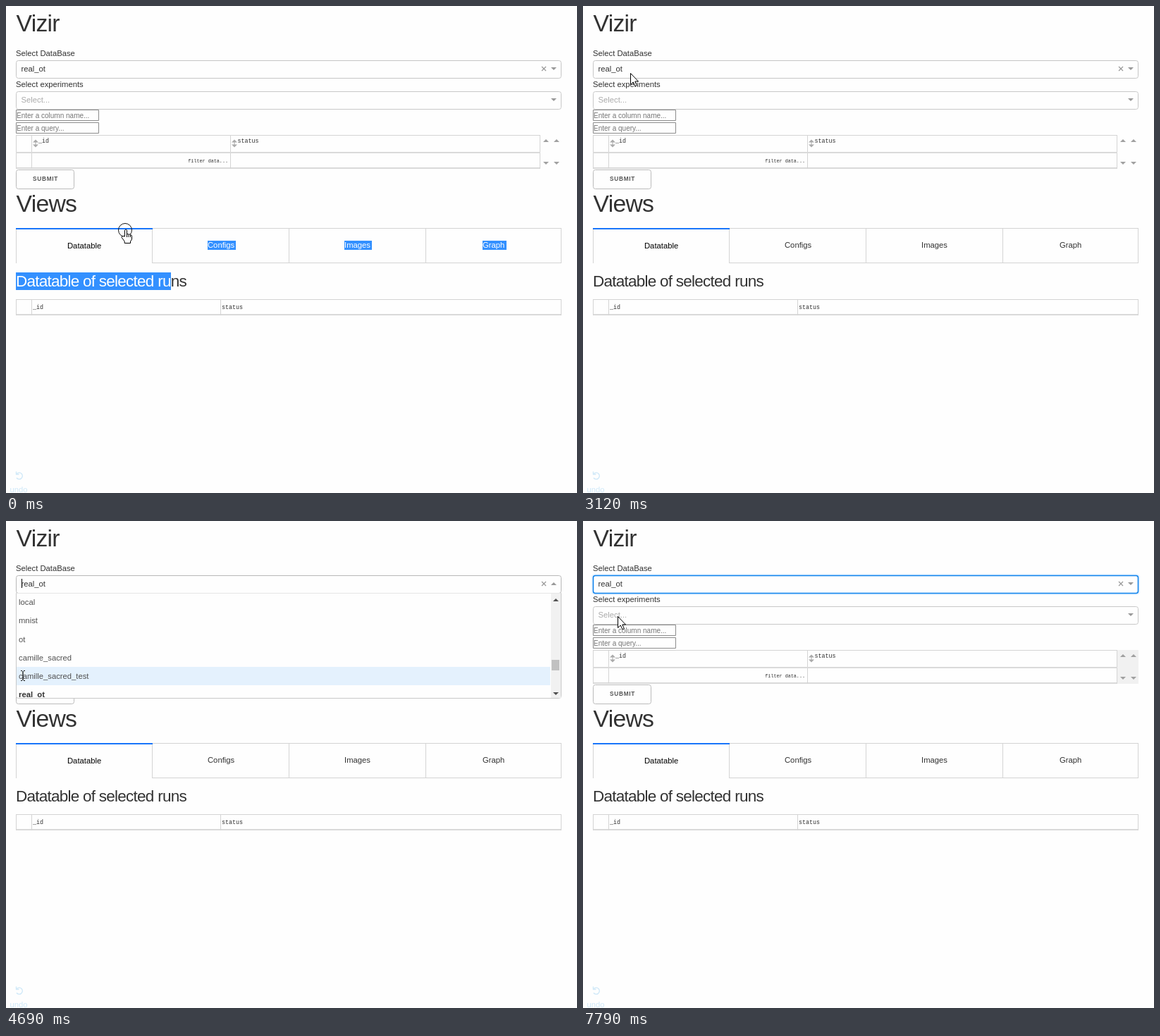
Recreate the animation shown at these times as an HTML page with a canvas. Size 810 by 691 pixels, loop 8 s.

```html
<!DOCTYPE html>
<html lang="en">
<head>
<meta charset="utf-8">
<title>Experiment dashboard</title>
<style>
  html, body { margin: 0; width: 100%; height: 100%; overflow: hidden; background: #fefefe; }
  canvas { display: block; }
</style>
</head>
<body>
<canvas id="stage" width="810" height="691"></canvas>
<script>
const ctx = document.getElementById('stage').getContext('2d');
const LOOP = 8000;
const BG = '#fefefe', LINE = '#d4d4d4', INK = '#323232', BLUE = '#1975fa';
const SANS = '"Liberation Sans", Arial, sans-serif';
const MONO = '"Liberation Mono", "DejaVu Sans Mono", monospace';
const BODY = 11.25;

// Pointer steps: start time, shape, hotspot, click ring
const pointer = [
  [0, 'hand', 169, 318, true],
  [270, 'arrow', 156, 291, true],
  [520, 'arrow', 156, 291, false],
  [1040, 'arrow', 156, 291, true],
  [1290, 'arrow', 156, 291, false],
  [2350, 'arrow', 222, 234, false],
  [2600, 'arrow', 125, 20, false],
  [2870, 'beam', 68, 77, false],
  [3120, 'arrow', 67, 95, false],
  [3400, 'beam', 69, 97, true],
  [3650, 'beam', 69, 97, false],
  [4440, 'beam', 53, 141, false],
  [4690, 'beam', 24, 220, false],
  [4940, 'beam', 34, 228, false],
  [5190, 'beam', 49, 243, false],
  [5440, 'beam', 45, 241, false],
  [5720, 'beam', 45, 234, false],
  [5990, 'beam', 45, 234, true],
  [6240, 'hand', 45, 234, false],
  [7020, 'arrow', 70, 90, false],
  [7270, 'arrow', 52, 131, false],
  [7540, 'arrow', 48, 138, false],
  [7790, 'arrow', 49, 135, false]
];

const options = ['local', 'mnist', 'ot', 'camille_sacred', 'camille_sacred_test', 'real_ot'];

function text(str, x, y, { size = BODY, color = INK, font = SANS, align = 'left', weight = '', gap = 0 } = {}) {
  ctx.font = `${weight} ${size}px ${font}`;
  ctx.letterSpacing = gap + 'px';
  ctx.textAlign = align;
  ctx.fillStyle = color;
  ctx.fillText(str, x, y);
}

function fill(x, y, w, h, color) {
  ctx.fillStyle = color;
  ctx.fillRect(x, y, w, h);
}

function box(x, y, w, h, stroke, radius = 0, bg = BG, width = 1) {
  ctx.beginPath();
  ctx.roundRect(x + .5, y + .5, w - 1, h - 1, radius);
  ctx.fillStyle = bg;
  ctx.fill();
  ctx.strokeStyle = stroke;
  ctx.lineWidth = width;
  ctx.stroke();
}

function poly(points, color) {
  ctx.beginPath();
  points.forEach(([x, y]) => ctx.lineTo(x, y));
  ctx.closePath();
  ctx.fillStyle = color;
  ctx.fill();
}

// dir: 1 points down, -1 points up
function triangle(x, y, dir, color = '#999') {
  poly([[x - 4, y - 2 * dir], [x + 4, y - 2 * dir], [x, y + 2 * dir]], color);
}

function strokePath(d, color, width = 1) {
  ctx.strokeStyle = color;
  ctx.lineWidth = width;
  ctx.stroke(new Path2D(d));
}

function table(x, y, right, bottom, cols) {
  fill(x, y, right - x, 1, LINE);
  fill(x, bottom - 2, right - x, 2, '#d9d9d9');
  [x, ...cols, right - 1].forEach(c => fill(c, y, 1, bottom - y, LINE));
}

function sortIcon(x, y) {
  triangle(x, y - 3.5, -1, '#aaa');
  triangle(x, y + 3.5, 1, '#aaa');
  fill(x - .5, y - 3, 1, 6, '#aaa');
}

function dbSelect(t) {
  const open = t >= 3400 && t < 6240, focused = t >= 6240;
  if (focused) {
    ctx.beginPath();
    ctx.roundRect(12, 75, 778, 30, 5);
    ctx.fillStyle = '#e5f2ff';
    ctx.fill();
  }
  box(14, 77, 774, 26, focused ? '#0a80ec' : open ? '#b8b8b8' : '#c6c6c6', 3, BG, focused ? 1.5 : 1);
  text('real_ot', 21.5, 93);
  strokePath('M760 86l6 6M766 86l-6 6', '#999', 1.2);
  triangle(777, 89, open ? -1 : 1);
  if (open) menu(t);
}

function menu(t) {
  const scrolled = t >= 4440 && t < 5440;
  const top = scrolled ? 102 : 94.5;
  const active = !scrolled ? 5 : t < 4690 ? 1 : 4;
  box(14, 102, 774, 150, '#c8c8c8', [0, 0, 3, 3]);
  fill(15, 102, 772, 1, '#e6e6e6');
  ctx.save();
  ctx.beginPath();
  ctx.rect(15, 103, 772, 148);
  ctx.clip();
  options.forEach((name, i) => {
    const y = top + i * 26.25, chosen = i === 5;
    if (i === active) fill(15, Math.round(y), 757, 26, '#e4f1fd');
    text(name, 18, Math.round(y + 17), { weight: chosen ? 'bold' : '', color: chosen ? '#333' : '#505050' });
  });
  fill(773, 103, 14, 148, '#f1f1f1');
  fill(774, scrolled ? 197 : 198, 11, 15, '#c1c1c1');
  triangle(780, 112, -1, '#505050');
  triangle(780, 245, 1, '#505050');
  ctx.restore();
  const caretOff = (t >= 3920 && t < 4440) || (t >= 4940 && t < 5440);
  if (!caretOff) fill(22, 82, 1, 13, '#000');
}

function runsTable(t) {
  if (t >= 6240) fill(758, 183, 30, 48, '#f1f1f1');
  table(14, 183, 758, 231, [36, 318]);
  fill(14, 207, 744, 2, '#dadada');
  sortIcon(42, 195);
  sortIcon(324, 195);
  const cell = { font: MONO, size: 8.35 };
  text('_id', 46, 194, cell);
  text('status', 328.5, 194, cell);
  text('filter data...', 315, 222, { font: MONO, size: 6.75, align: 'right' });
  [766, 781].forEach(x => {
    triangle(x, 191, -1, '#a0a0a0');
    triangle(x, 223, 1, '#a0a0a0');
  });
}

function form(t) {
  text('Vizir', 14.5, 36, { size: 33.75, gap: -.75 });
  text('Select DataBase', 14, 71);
  text('Select experiments', 14, 115);
  box(14, 121, 774, 26, '#c8c8c8', 3);
  text('Select...', 21.5, 137, { color: '#aaa' });
  triangle(777, 133, 1);
  [['Enter a column name...', 147], ['Enter a query...', 165]].forEach(([label, y]) => {
    box(14, y, 118, 16, '#8c8c8c');
    text(label, 15, y + 12, { size: 10, color: '#757575' });
  });
  runsTable(t);
  const hover = t >= 6240 && t < 7020;
  box(14, 232, 83, 28, hover ? '#888' : '#bbb', 3);
  text('SUBMIT', 38, 248, { size: 8.25, weight: 'bold', gap: .75, color: hover ? '#333' : '#555' });
  dbSelect(t);
}

function views(t) {
  text('Views', 14.5, 292, { size: 33.75, gap: -.75 });
  const selected = t < 1290;
  const tabs = [['Datatable', 111, 51], ['Configs', 305, 40], ['Images', 498.5, 39], ['Graph', 691.5, 34]];
  fill(14, 315, 1, 50, LINE);
  fill(207, 315, 581, 1, LINE);
  fill(207, 364, 581, 1, LINE);
  [207, 401, 595, 787].forEach(x => fill(x, 315, 1, 50, LINE));
  fill(14, 315, 194, 2, BLUE);
  tabs.forEach(([name, mid, width], i) => {
    const marked = selected && (i > 0 || t >= 270);
    const y = i ? 343 : 344;
    ctx.font = `${BODY}px ${SANS}`;
    ctx.letterSpacing = '0px';
    const x = Math.round(mid - ctx.measureText(name).width / 2);
    if (marked) fill(x, y - 10, width, 13, '#3390ff');
    text(name, x, y, { color: marked ? '#fff' : i ? INK : '#000' });
  });

  const heading = color => text('Datatable of selected runs', 14, 398, { size: 22.5, gap: -.75, color });
  heading(INK);
  if (selected) {
    ctx.save();
    ctx.beginPath();
    ctx.rect(14, 378, 220, 25);
    ctx.clip();
    fill(14, 378, 220, 25, '#3390ff');
    heading('#fff');
    ctx.restore();
  }
  table(14, 416, 788, 439, [36, 304]);
  text('_id', 38, 430, { font: MONO, size: 8.35 });
  text('status', 306, 430, { font: MONO, size: 8.35 });
}

function undo() {
  const tint = '#cfe8f8';
  strokePath('M15.5 663.5A4.6 4.6 0 1 1 15 669.5M14.5 660.5v4h4', tint, 1.3);
  text('undo', 5.5, 690, { color: tint });
}

const cursors = {
  arrow() {
    const p = new Path2D('M.5 .5V16.5L4.3 13 7 18.8 9.4 17.7 6.8 12H11.5Z');
    ctx.fillStyle = '#fff';
    ctx.fill(p);
    ctx.strokeStyle = '#000';
    ctx.lineWidth = 1;
    ctx.stroke(p);
  },
  beam() {
    strokePath('M-3 -7.5H-1M1 -7.5H3M-3 6.5H-1M1 6.5H3M0 -7V6', '#000', 1.2);
  },
  hand() {
    const p = new Path2D('M-.5 9V0Q1 -2.5 2.5 0V6Q4 4.6 5 6.3 6.7 5.3 7.6 7 9.5 6.5 9.5 8.5V13L7.5 16V18.5H-.8V16L-4.8 10.5Q-5.3 8 -3 8.5Z');
    ctx.fillStyle = '#fff';
    ctx.fill(p);
    ctx.strokeStyle = '#000';
    ctx.lineWidth = 1;
    ctx.stroke(p);
    strokePath('M2.5 6V10M5 6.5V10M7.5 7V10', '#000');
  }
};

function drawPointer(t) {
  const [, shape, x, y, ring] = pointer.findLast(step => step[0] <= t);
  ctx.save();
  ctx.translate(x, y);
  if (ring) {
    const [dx, dy] = shape === 'arrow' ? [1, 1] : shape === 'beam' ? [-.5, 0] : [0, 0];
    ctx.beginPath();
    ctx.arc(dx, dy, 9.5, 0, Math.PI * 2);
    ctx.strokeStyle = '#111';
    ctx.lineWidth = 1;
    ctx.stroke();
  }
  cursors[shape]();
  ctx.restore();
}

function draw(now) {
  const t = now % LOOP;
  fill(0, 0, 810, 691, BG);
  form(t);
  views(t);
  undo();
  drawPointer(t);
}

const start = performance.now();
function tick() {
  draw(performance.now() - start);
  requestAnimationFrame(tick);
}
tick();
</script>
</body>
</html>
```
